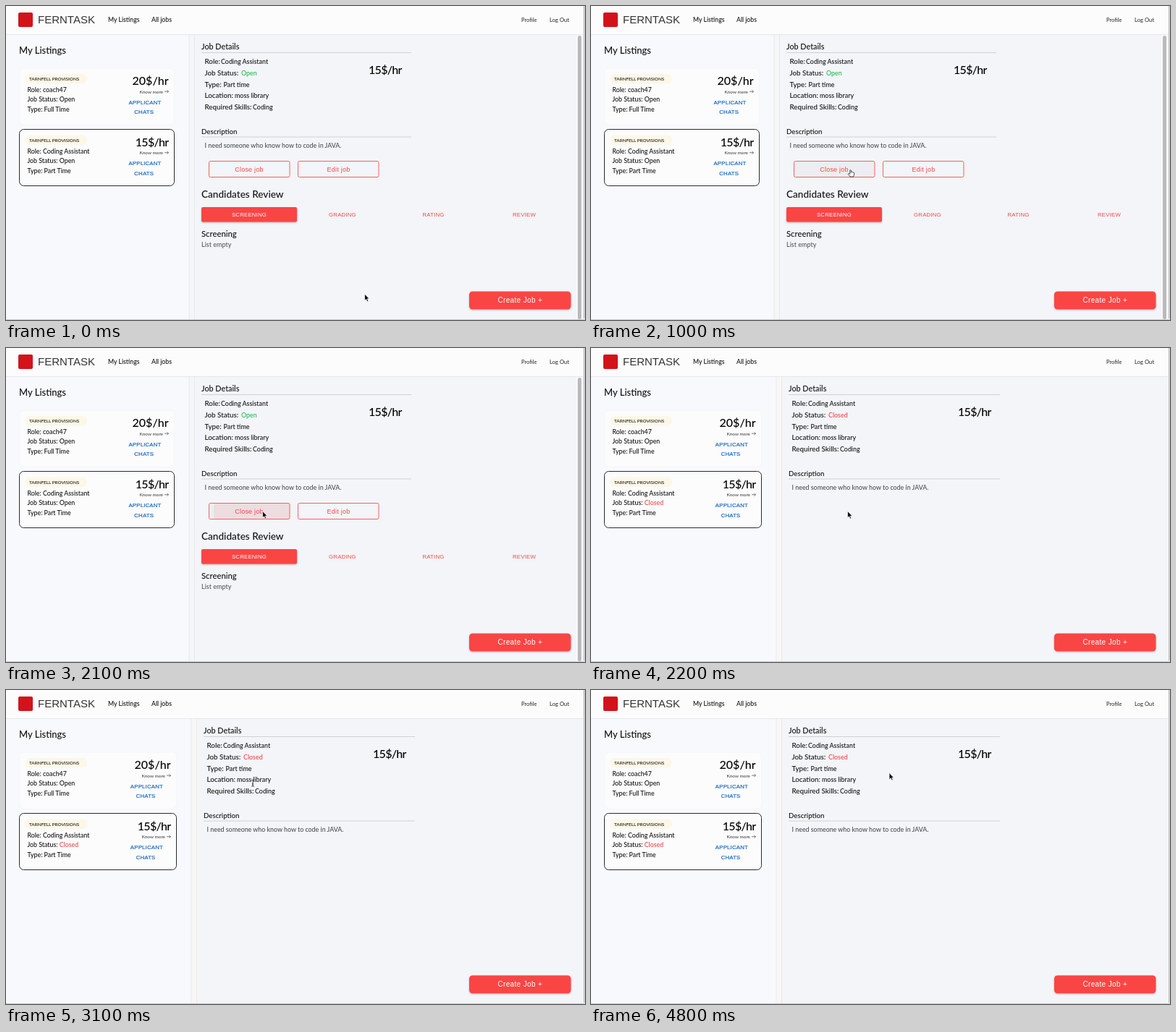
Animation, 800 px wide and 434 px high, one loop 4900 ms. Source, as an HTML page:

```html
<!DOCTYPE html>
<html lang="en">
<head>
<meta charset="utf-8">
<title>Job listings</title>
<style>
  html, body { margin: 0; width: 100%; height: 100%; overflow: hidden; background: #f8f9fc; }
  svg { display: block; width: 100%; height: 100%; }
  text { font-family: Lato, sans-serif; font-weight: 500; white-space: pre; }
  .btn { font-family: "Liberation Sans", Arial, sans-serif; font-weight: 400; letter-spacing: .025em; }
  .link { stroke: #1d6cc0; stroke-width: .22; }
</style>
</head>
<body>
<svg id="stage" viewBox="0 0 800 434"></svg>
<script>
const LOOP = 4900, STEP = 100;
const CLOSE_AT = 2200, PRESS_AT = 2000, SELECT_AT = 3700, DESELECT_AT = 4700;
const RED = '#fa4545', INK = '#111';

const text = (x, y, size, str, fill = INK, extra = '') =>
  `<text x="${x}" y="${y}" font-size="${size}" fill="${fill}" ${extra}>${str}</text>`;
const rect = (x, y, w, h, fill, extra = '') =>
  `<rect x="${x}" y="${y}" width="${w}" height="${h}" fill="${fill}" ${extra}/>`;
const button = (cx, y, size, str, fill, cls = '') =>
  text(cx, y, size, str, fill, `class="btn ${cls}" text-anchor="middle"`);
const price = (x, y, str, anchor) =>
  text(x, y, 16, str, '#000', `text-anchor="${anchor}" letter-spacing="${str[0] === '1' ? -.7 : 0}"`);

function header() {
  return rect(0, 0, 800, 39, '#fcfcfd') + rect(0, 39, 797, 1, '#e6e7e9') +
    rect(17, 9, 20, 20, '#d2131c', 'rx="2"') +
    text(44, 24.3, 15, 'FERNTASK', '#333', 'style="font-family:\'Liberation Sans\',Arial,sans-serif;font-weight:400"') +
    text(141, 22, 8.7, 'My Listings') + text(201, 22, 8.7, 'All jobs') +
    text(712, 22, 7.5, 'Profile', '#333') + text(751, 22, 7.7, 'Log Out', '#333');
}

function card(y, dx, job) {
  const right = 225 + dx, mid = 192 + dx * .8;
  const frame = job.active ? 'stroke="#2b2b2f"' : 'stroke="#f5f6f8"';
  return rect(18.5, y, 214 + dx, 78, '#fcfcfd', `rx="6" ${frame}`) +
    rect(26, y + 8, 86, 13.5, '#fdf7e7', 'rx="6.7"') +
    text(32, y + 17.2, 6.35, 'TARNFELL PROVISIONS') +
    text(29.5, y + 33, 8.8, `Role: ${job.role}`) +
    text(29.5, y + 46.3, 8.8, `Job Status: <tspan fill="${job.status === 'Closed' ? '#f04444' : INK}">${job.status}</tspan>`) +
    text(29.5, y + 60, 8.8, `Type: ${job.type}`) +
    price(right - .5, y + 23.3, job.pay, 'end') +
    text(right - 8, y + 34.5, 6.4, 'Know more', '#444', 'text-anchor="end"') +
    `<path d="M${right - 6} ${y + 32.2}h5.5m-2-2l2 2l-2 2" fill="none" stroke="#444" stroke-width=".7"/>` +
    button(mid, y + 49.5, 7.8, 'APPLICANT', '#1d6cc0', 'link') +
    button(mid - 1.3, y + 63.2, 7.8, 'CHATS', '#1d6cc0', 'link');
}

function details(dx, closed) {
  const x = 270 + dx, lineEnd = closed ? 565 : 560;
  const rows = [
    ['Role:', 297, 'Coding Assistant'],
    ['Job Status:', 325, closed ? 'Closed' : 'Open'],
    ['Type:', 300.5, 'Part time'],
    ['Location:', 316, 'moss library'],
    ['Required Skills:', 341, 'Coding']
  ];
  const color = i => i === 1 ? (closed ? '#f04444' : '#22b950') : INK;
  return text(x, 60, 10.8, 'Job Details') + rect(x, 64, lineEnd - x, 1, '#cfd1d4') +
    (closed ? rect(328, 84.5, 27, 15.5, '#a8c8f0', 'id="mark"') : '') +
    rows.map(([label, vx, value], i) => {
      const y = 80.2 + i * 15.7;
      return text(x + 4.5, y, 9.8, label) + text(vx + dx, y, 8.9, value, color(i));
    }).join('') +
    price(closed ? 507 : 501, 94, '15$/hr', 'start') +
    text(x, 176.6, 9.7, 'Description') + rect(x, 180.5, lineEnd - x, 1, '#cfd1d4') +
    text(x + 4.5, 195.5, 8.85, 'I need someone who know how to code in JAVA.', '#4b4d52');
}

function review() {
  const outline = x => rect(x, 214.5, 111.5, 22, 'none', `rx="2" stroke="#f76060"`);
  return rect(280.5, 214.5, 111.5, 22, '#eceef1', 'id="hover" rx="2"') +
    '<g clip-path="url(#pressClip)"><circle id="ripple" cx="356" cy="226" fill="#f04444" fill-opacity=".1"/></g>' +
    outline(280.5) + outline(403.5) +
    button(336, 228.5, 9, 'Close job', RED) + button(459.5, 228.5, 9, 'Edit job', RED) +
    text(270, 264.8, 13.6, 'Candidates Review') +
    rect(270, 278, 132, 20.5, RED, 'rx="2" filter="url(#shade)"') +
    button(336, 290.8, 7.8, 'SCREENING', '#fff') +
    button(465, 290.8, 7.8, 'GRADING', RED) +
    button(590.5, 290.8, 7.8, 'RATING', RED) +
    button(716, 290.8, 7.8, 'REVIEW', RED) +
    text(270, 319, 11.3, 'Screening') + text(270, 332.8, 9, 'List empty', '#55585e') +
    rect(788, 40, 9, 394, '#f9f9fa') + rect(790, 41, 5, 392, '#b9babc', 'rx="2.5"');
}

function page(closed) {
  const dx = closed ? 3 : 0;
  return rect(253 + dx, 40, 8, 394, closed ? '#f9f7f5' : '#f5f6f8') +
    rect(252.5 + dx, 40, 1, 394, '#e9eaed') +
    rect(260 + dx, 40, 537 - dx, 394, '#f3f5f8') +
    rect(260 + dx, 40, 1, 394, '#e7e9ec') +
    text(18, 66.3, 13, 'My Listings') +
    card(86, dx, { role: 'coach47', status: 'Open', type: 'Full Time', pay: '20$/hr' }) +
    card(170.5, dx, { role: 'Coding Assistant', status: closed ? 'Closed' : 'Open', type: 'Part Time', pay: '15$/hr', active: true }) +
    details(dx, closed) + (closed ? '' : review());
}

const cursors = {
  arrow: '<path d="M0 0V9.2L2.1 7.3L3.6 10.6L5.2 9.9L3.8 6.7H6.5Z" fill="#111" stroke="#fff" stroke-width=".7"/>',
  hand: '<path d="M-.7 1Q0-.4 .8 1V4.2L1.1 3.4Q2.1 2.8 2.6 3.8Q3.6 3.2 4.1 4.2Q5.4 3.9 5.3 5.2L4.7 8.3L4 10H-.3L-3.1 6.5Q-3.2 5-1.8 5.5L-.7 6.5Z" fill="#fff" stroke="#222" stroke-width=".8"/>',
  beam: '<path d="M-1.8-4.5Q0-4.5 0-3.4Q0-4.5 1.8-4.5M0-3.4V3.6M-1.8 4.7Q0 4.7 0 3.6Q0 4.7 1.8 4.7M-1 1.5H1" fill="none" stroke="#222" stroke-width=".9"/>'
};

const stage = document.getElementById('stage');
stage.innerHTML = `<defs>
  <filter id="shade" x="-10%" y="-30%" width="120%" height="180%">
    <feDropShadow dx="0" dy="1" stdDeviation="1.1" flood-opacity=".28"/></filter>
  <clipPath id="pressClip">${rect(280.5, 214.5, 111.5, 22, '#000', 'rx="2"')}</clipPath></defs>` +
  rect(0, 0, 800, 434, '#f8f9fc') +
  `<g id="open">${page(false)}</g><g id="closed">${page(true)}</g>` + header() +
  rect(640, 394.5, 140.5, 24.8, RED, 'rx="4.5" filter="url(#shade)"') +
  text(710.3, 410.3, 10, 'Create Job +', '#fff', 'class="btn" text-anchor="middle" style="letter-spacing:.035em"') +
  rect(797, 0, 3, 434, '#f4f4f5') + rect(798, 0, 1.5, 432, '#bdbec0') + rect(0, 433, 800, 1, '#c6c7c9') +
  '<g id="cursor">' + Object.entries(cursors).map(([k, d]) => `<g id="${k}">${d}</g>`).join('') + '</g>';

const el = id => document.getElementById(id);
const show = (id, on) => el(id).setAttribute('visibility', on ? 'inherit' : 'hidden');

// time, x, y of the pointer's hot spot
const path = [
  [0, 495.5, 398], [450, 495.5, 398], [950, 358.5, 226], [1900, 358.5, 226],
  [2050, 354.5, 225.5], [2800, 354.5, 225.5], [3100, 341, 128.5], [3300, 341, 128.5],
  [3600, 342, 92.5], [4050, 342, 92.5], [4550, 412, 114.5], [LOOP, 412, 114.5]
];

function pointer(t) {
  const i = path.findIndex(p => p[0] > t);
  const [t0, x0, y0] = path[i - 1], [t1, x1, y1] = path[i];
  const u = (t - t0) / (t1 - t0), k = u * u * (3 - 2 * u);
  return [x0 + (x1 - x0) * k, y0 + (y1 - y0) * k];
}

function draw(t) {
  const closed = t >= CLOSE_AT;
  const [x, y] = pointer(t);
  const over = !closed && x > 280 && x < 392 && y > 214 && y < 237;
  const kind = over && t < 2050 ? 'hand' : t >= 3000 && t < 4250 ? 'beam' : 'arrow';
  show('open', !closed);
  show('closed', closed);
  el('hover').setAttribute('fill-opacity', over ? 1 : 0);
  el('ripple').setAttribute('r', t >= PRESS_AT ? 30 + (t - PRESS_AT) * .39 : 0);
  el('mark').setAttribute('fill-opacity', t >= SELECT_AT && t < DESELECT_AT ? 1 : 0);
  el('cursor').setAttribute('transform', `translate(${x} ${y})`);
  for (const k in cursors) show(k, k === kind);
}

function tick() {
  draw(Math.floor(performance.now() % LOOP / STEP) * STEP);
  requestAnimationFrame(tick);
}
tick();
</script>
</body>
</html>
```
